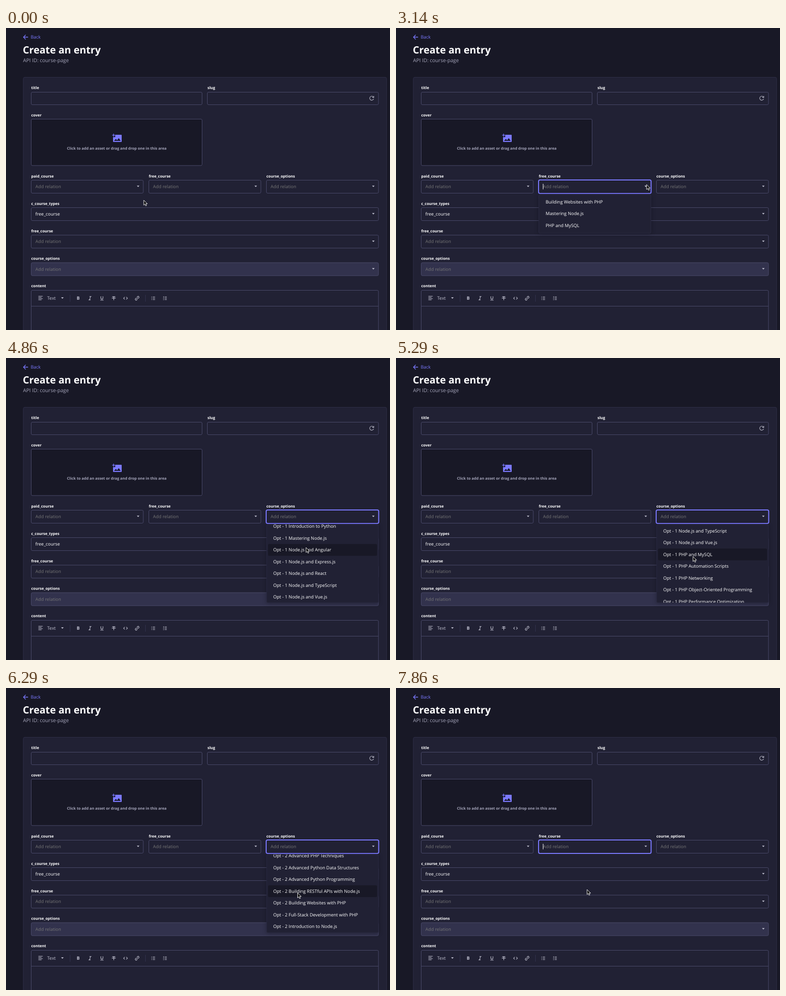
An HTML page for the animation above (8 s loop, 800 by 628 pixels).

```html
<!DOCTYPE html>
<html lang="en">
<head>
<meta charset="utf-8">
<title>Create an entry</title>
<style>
  html, body { margin: 0; width: 100%; height: 100%; overflow: hidden; background: #181826; }
  svg { display: block; width: 100vw; height: 100vh; }
  text { font: 9.38px "Open Sans", "Noto Sans", sans-serif; fill: #fff; text-rendering: geometricPrecision; white-space: pre; }
  .h1 { font-size: 20.9px; font-weight: 700; }
  .sub { font-size: 10.55px; fill: #a5a5ba; }
  .label { font-size: 7.93px; font-weight: 700; }
  .drop { font-size: 7.76px; font-weight: 700; fill: #a5a5ba; text-anchor: middle; }
  .hint { fill: #757575; }
  .tool { fill: #c0c0cf; }
  .mid { text-anchor: middle; }
  .accent { fill: #7b79ff; }
  .field { fill: #212134; stroke: #4a4a6a; }
  .off { fill: #32324d; }
  .dark { fill: #181826; }
  .ring { fill: none; stroke: #7b79ff; stroke-width: 2; }
  .menu { fill: #212134; stroke: #2b2b43; filter: drop-shadow(0 1px 4px rgba(3, 3, 5, .3)); }
  .line { fill: none; stroke: #c0c0cf; }
  .pointer { fill: #111; stroke: #fff; stroke-width: .9; stroke-linejoin: round; }
</style>
</head>
<body>
<svg viewBox="0 0 800 628" preserveAspectRatio="none">
  <defs>
    <clipPath id="list"><rect x="543" y="346" width="233" height="163"/></clipPath>
  </defs>
  <rect width="800" height="628" fill="#181826"/>
  <path d="M46 19H36.8M41 14.3L36.4 19L41 23.7" fill="none" stroke="#7b79ff" stroke-width="1.3"/>
  <text class="accent" x="51.5" y="22.4">Back</text>
  <text class="h1" x="35" y="53">Create an entry</text>
  <text class="sub" x="35.6" y="70.8">API ID: course-page</text>
  <rect x="36" y="102.5" width="757" height="560" rx="3" fill="#212134" stroke="#2e2e47"/>

  <g id="form"></g>

  <g fill="none" stroke="#c0c0cf" stroke-width="1.1">
    <path d="M765.3 143.4A4.2 4.2 0 1 0 766 147.2"/>
    <path d="M766.2 141.4V144.4H763"/>
  </g>
  <path class="accent" fill-rule="evenodd" d="M227.5 222H240a1 1 0 0 1 1 1V236a1 1 0 0 1 -1 1H224a1 1 0 0 1 -1 -1V227H227.5ZM225 234.8H239L235 229L231.5 233.2L228.8 230.8Z"/>
  <path d="M224.2 219.8V226M221.2 222.9H227.2" stroke="#7b79ff" stroke-width="1.4"/>
  <text class="drop" x="230.7" y="252.6">Click to add an asset or drag and drop one in this area</text>

  <path d="M52.5 578.5H776" stroke="#4a4a6a"/>
  <path d="M133.5 555V569M290.5 555V569" stroke="#32324d"/>
  <g class="line">
    <path d="M67.5 557.8H76.5M67.5 560.3H74M67.5 562.8H76.5M67.5 565.3H74"/>
    <path d="M196.5 566H203.2M197.6 558V561.5a2.2 2.4 0 0 0 4.4 0V558" stroke-width="1.1"/>
    <path d="M173.8 558.2H178M172 565.4H176.2M176 558.2L174.2 565.4" stroke-width="1.1"/>
    <path d="M221.3 558.6H227.7M224.5 558.6V566M220.5 561.6H228.5" stroke-width="1.2"/>
    <path d="M247.4 559.4L245 561.9L247.4 564.4M250.6 559.4L253 561.9L250.6 564.4" stroke-width="1.1"/>
    <g transform="translate(273.2 562) rotate(-45)" stroke-width="1.1">
      <path d="M-1 -1.9H-3a1.9 1.9 0 0 0 0 3.8H-1M1 -1.9H3a1.9 1.9 0 0 1 0 3.8H1M-2 0H2"/>
    </g>
    <path d="M305.8 559.2H310.5M305.8 562H310.5M305.8 564.8H310.5M302.8 559.2H304.2M302.8 562H304.2M302.8 564.8H304.2"/>
    <path d="M330.5 559.2H335M330.5 562H335M330.5 564.8H335M328.3 558V560.6M327.4 562.3H329M327.4 565H329"/>
  </g>
  <text class="tool" x="85.8" y="565">Text</text>
  <text class="tool mid" x="150.5" y="565.4" font-weight="700" style="font-weight:700">B</text>

  <rect id="ring" class="ring" y="316" width="234.5" height="28" rx="3"/>
  <g id="paid"></g>
  <g id="free"></g>
  <g id="options">
    <rect class="menu" x="543" y="346.5" width="233" height="162.5" rx="2.5"/>
    <g clip-path="url(#list)">
      <rect id="hover" x="546" width="227" height="24.5" rx="2.5" fill="#181826"/>
      <g id="rows"></g>
    </g>
  </g>
  <rect id="caret" y="324" width="1" height="11.5" fill="#fff"/>
  <g id="pointer" class="pointer">
    <path id="arrow" d="M0 0V10.4L2.4 8.2L4.1 11.9L5.9 11.1L4.2 7.5H7.5Z"/>
    <path id="hand" d="M-1.2 .6a1.1 1.1 0 0 1 2.3 0V4.2L5.8 5.2Q7.3 5.6 7.2 7L6.4 11.8H.4L-3.4 7.4Q-3.4 5.8 -1.2 7Z"/>
  </g>
</svg>
<script>
const $ = id => document.getElementById(id);
const ROW = 24.5, TOP = 361.5;
const COLS = { paid: 52.5, free: 297.5, options: 542.5 };

const text = (x, y, s, cls = "") => `<text class="${cls}" x="${x}" y="${y}">${s}</text>`;
const box = (x, y, w, h, cls = "") => `<rect class="field ${cls}" x="${x}" y="${y}" width="${w}" height="${h}" rx="2.5"/>`;
const tri = (x, y) => `<path class="tool" d="M${x - 2.7} ${y - 1.4}h5.4l-2.7 3z"/>`;
const select = (x, y, w, label, value = "Add relation", cls = "hint", look = "") =>
  text(x, y - 6, label, "label") + box(x, y, w, 27, look) +
  text(x + 8.8, y + 16.6, value, cls) + tri(x + w - 10.7, y + 12.7);
const rowText = (x, items) => items.map((s, i) => text(x, TOP + 3.4 + i * ROW, s)).join("");

$("form").innerHTML =
  text(52.5, 127.2, "title", "label") + box(52.5, 133.5, 356, 26) +
  text(419.7, 127.2, "slug", "label") + box(419.5, 133.5, 356.5, 26) +
  text(52.5, 183.8, "cover", "label") + box(52.5, 189.5, 356, 96.5, "dark") +
  select(COLS.paid, 316.5, 233.5, "paid_course") +
  select(COLS.free, 316.5, 233.5, "free_course") +
  select(COLS.options, 316.5, 233.5, "course_options") +
  select(52.5, 373.5, 723.5, "c_course_types", "free_course", "") +
  select(52.5, 430.7, 723.5, "free_course") +
  select(52.5, 488, 723.5, "course_options", "Add relation", "hint", "off") +
  text(52.5, 539.2, "content", "label") + box(52.5, 545.5, 723.5, 120) + tri(117.5, 561.3);

const shortMenu = (id, items) => {
  const x = COLS[id];
  $(id).innerHTML = `<rect class="menu" x="${x}" y="346.5" width="233.5" height="80.5" rx="2.5"/>` + rowText(x + 14.2, items);
};
shortMenu("paid", ["Advanced Python Data Structures", "PHP Automation Scripts", "Python for Automation"]);
shortMenu("free", ["Building Websites with PHP", "Mastering Node.js", "PHP and MySQL"]);

const courses = [
  "Advanced PHP Techniques", "Advanced Python Data Structures", "Advanced Python Programming",
  "Building RESTful APIs with Node.js", "Building Websites with PHP", "Full-Stack Development with PHP",
  "Introduction to Node.js", "Introduction to PHP", "Introduction to Python", "Mastering Node.js",
  "Node.js and Angular", "Node.js and Express.js", "Node.js and React", "Node.js and TypeScript",
  "Node.js and Vue.js", "PHP and MySQL", "PHP Automation Scripts", "PHP Networking",
  "PHP Object-Oriented Programming", "PHP Performance Optimization", "PHP Security Best Practices",
  "PHP Template with Twig", "Python Data Science", "Python Data Visualization",
  "Python for Automation", "Python Machine Learning", "Python Web Development"
];
$("rows").innerHTML = rowText(556.8, [1, 2].flatMap(n => courses.map(c => `Opt - ${n} ${c}`)));

const path = [
  [3, 287, 358], [6, 281, 328], [8, 274, 313], [9, 276, 328], [12, 276, 328], [17, 496, 329],
  [19, 524, 325], [20, 524, 311], [22, 522, 325.5], [23, 522, 325.5], [29, 760, 328], [31, 763, 328],
  [33, 640, 385], [34, 625, 394], [40, 612.5, 431.5], [44, 607.5, 426], [48, 602, 428], [51, 398, 419]
];
const scrollKeys = [[32, 0], [34, 207.5], [40, 433.5], [44, 674], [48, 880]];
const blinks = [[9, 12], [16, 19], [21, 24], [28, 31], [31, 34], [38, 41], [45, 48], [51, 53], [54, 56]];

function at(keys, k) {
  const i = keys.findIndex(key => key[0] >= k);
  if (i < 0) return keys[keys.length - 1].slice(1);
  if (i === 0) return keys[0].slice(1);
  const a = keys[i - 1], b = keys[i], p = (k - a[0]) / (b[0] - a[0]);
  return a.slice(1).map((v, j) => v + (b[j + 1] - v) * p);
}
const within = (k, a, b) => k >= a && k < b;
const show = (id, on) => $(id).setAttribute("visibility", on ? "visible" : "hidden");

function draw(k) {
  const focus = k < 9 ? null : k < 21 ? "paid" : k < 31 ? "free" : k < 54 ? "options" : "free";
  show("ring", focus);
  show("caret", focus && blinks.some(([a, b]) => within(k, a, b)));
  if (focus) {
    $("ring").setAttribute("x", COLS[focus] - .5);
    $("caret").setAttribute("x", COLS[focus] + 8.5);
  }
  show("paid", within(k, 9, 19));
  show("free", within(k, 21, 30));
  const open = within(k, 31, 53);
  show("options", open);

  const [scroll] = at(scrollKeys, k);
  $("rows").setAttribute("transform", `translate(0 ${-scroll})`);
  const y = at(path, Math.min(k, 48))[1] - 2;
  const row = Math.round((y - TOP + scroll) / ROW);
  $("hover").setAttribute("y", TOP + row * ROW - scroll - ROW / 2);
  show("hover", open && y > 346);

  const hand = within(k, 9, 13) || within(k, 30, 32);
  show("hand", hand);
  show("arrow", !hand);
  $("pointer").setAttribute("transform", `translate(${at(path, k).join(" ")})`);
}

function tick() {
  const t = performance.now() % 8000;
  draw(Math.floor((t + 5) * 7 / 1000) % 56);
  requestAnimationFrame(tick);
}
tick();
</script>
</body>
</html>
```
